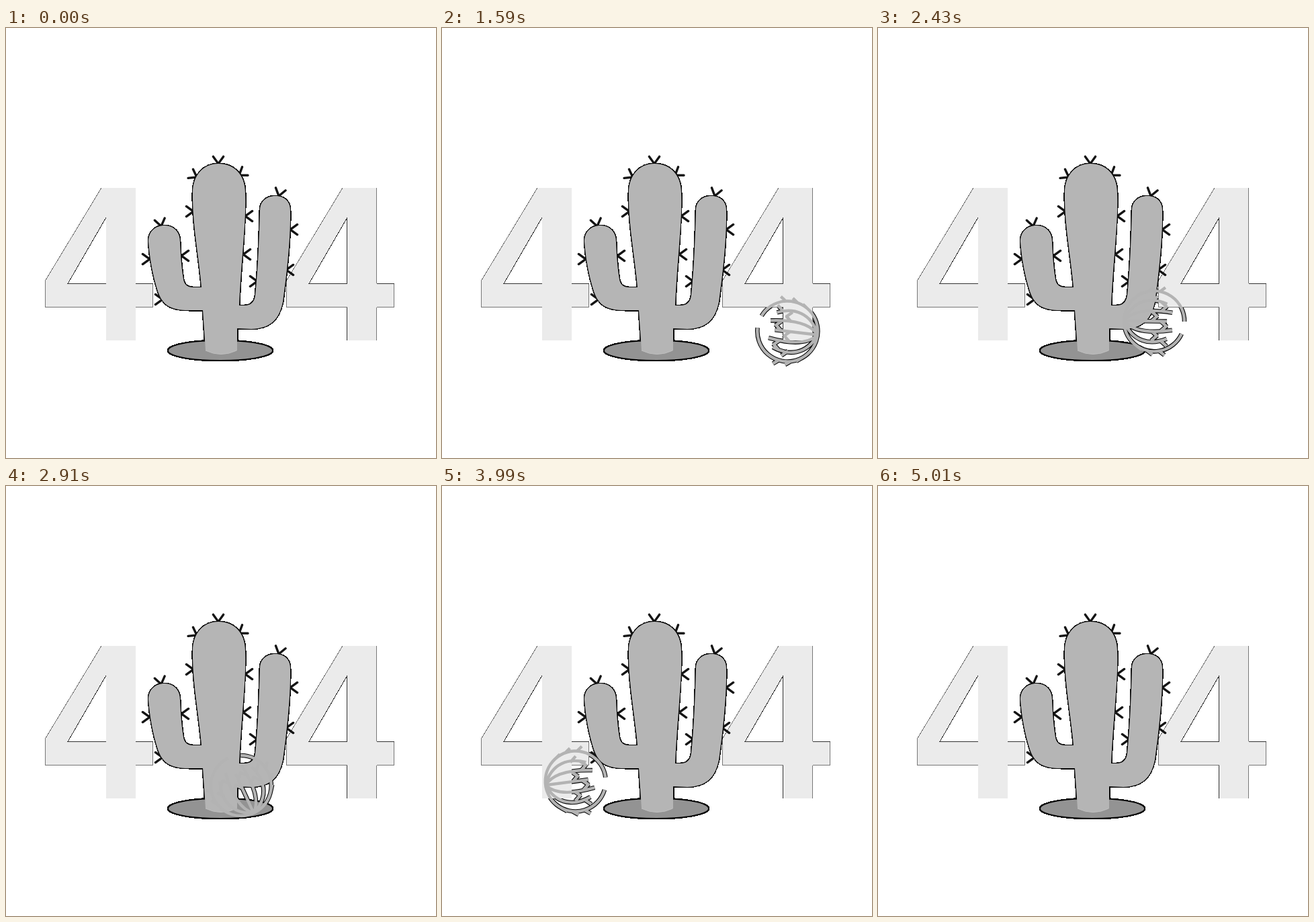
Animation of 640 by 640 pixels, one loop 5.43 s. Source, as an HTML page:

```html
<!DOCTYPE html>
<html lang="en">
<head>
<meta charset="utf-8">
<title>404</title>
<style>
  html, body { margin: 0; width: 100%; height: 100%; overflow: hidden; background: #fff; }
  svg { display: block; width: 100vw; height: 100vh; }
  .edge { fill: none; stroke: #777; shape-rendering: crispEdges; }
  .dark { stroke: #333; }
  .outline { stroke: #080808; stroke-width: 3; shape-rendering: crispEdges; }
  .weed { fill: none; stroke-linejoin: round; }
  #shade { stroke: #050505; stroke-width: 6.6; }
  #weed { stroke: #b3b3b3; stroke-width: 4.4; }
</style>
</head>
<body>
<svg viewBox="0 0 640 640" role="img" aria-label="404">
  <defs>
    <g id="four">
      <path fill="#ebebeb" fill-rule="evenodd"
        d="M142 238H193V380H219V415H193V465H149V415H58V376ZM149 282L92 380H149Z"/>
      <path class="edge" d="M142 238L58.5 376V415.5H149M193 415.5H218.5V380"/>
      <path class="edge dark" d="M149 282L92 380.5H149M193 380.5H219"/>
    </g>
    <path id="body" d="M278 245C278 219 294 202 316 202C340 202 356 219 356 245
      C358 285 350 345 347 413H355Q369 413 371 398C375 360 377 310 378 271
      C378 258 388 250 401 250C414 250 423 258 423 271C424 310 418 365 412 408
      C406 436 392 447 365 448L344 447V480Q320 491 297 480L293 420H272
      C244 420 233 412 226 392C219 370 214 345 212 318C212 303 222 294 236 294
      C250 294 259 304 259 318C260 340 261 355 264 374Q266 386 278 386H291
      C287 340 277 290 278 245Z"/>
    <path id="weedShape"/>
  </defs>

  <use id="shade" class="weed" href="#weedShape"/>

  <use href="#four"/>
  <g transform="translate(359)">
    <use href="#four"/>
    <path class="edge dark" d="M148.5 282V380M148.5 416V465"/>
    <path class="edge" d="M192.5 238V380M192.5 416V465"/>
  </g>

  <path id="spines" fill="none" stroke="#141414" stroke-width="3.4" stroke-linecap="round"/>
  <use href="#body" class="outline"/>
  <ellipse class="outline" cx="319" cy="480" rx="78" ry="15"/>
  <ellipse cx="319" cy="480" rx="77" ry="14" fill="#939393"/>
  <use href="#body" fill="#b5b5b5"/>
  <path d="M297 480Q320 491 343 480" fill="none" stroke="#bebebe"/>

  <use id="weed" class="weed" href="#weedShape"/>
</svg>
<script>
const LOOP = 5430, STEP = 30, START = 870, END = 5010, TAU = Math.PI * 2;
const $ = id => document.getElementById(id);
const lerp = (a, b, u) => a + (b - a) * u;
const polar = (x, y, angle, r) => `${x + r * Math.cos(angle)} ${y + r * Math.sin(angle)}`;

// Spines grow in pairs, pointing away from the axis of their limb
const limbs = [
  { x: 236, top: 318, roots: [[231, 295], [214, 344], [261, 339], [233, 404]] },
  { x: 316, top: 240, roots: [[316, 202], [284, 222], [347, 219], [279, 273], [356, 280], [353, 337]] },
  { x: 400, top: 272, roots: [[406, 250], [423, 300], [417, 360], [374, 377]] }
];
function spinePath() {
  let d = "";
  for (const { x: axis, top, roots } of limbs)
    for (const [x, y] of roots) {
      const out = Math.atan2(y - Math.max(y, top), x - axis);
      for (const turn of [-0.62, 0.62])
        d += `M${polar(x, y, out + turn, 2)}L${polar(x, y, out + turn, 13)}`;
    }
  return d;
}

// An open ring with five branching stems fanning up from its foot
function weedPath() {
  let d = "M18.3 -41.1A45 45 0 1 1 0 -45";
  for (let k = -2; k <= 2; k++) {
    const tip = k % 2 ? -27 : -19;
    d += `M0 45C${16 * k} 32 ${18 * k} 5 ${13 * k} ${tip}`;
    for (const side of [-1, 1]) {
      const y = side * (k % 2 ? 7 : -7) - 3;
      const x = k * 14.5;
      d += `M${x} ${y}l${side * 8} -9`;
    }
  }
  for (const side of [-1, 1])
    for (const y of [-8, 10, 26]) {
      const x = side * Math.sqrt(45 * 45 - y * y);
      d += `M${x} ${y}l${side * 6} -8`;
    }
  return d;
}

// One [x, y] per bounce, evenly spaced in time
const bounces = [[584, 417], [518, 453], [434, 430], [346, 446], [253, 419], [149, 447], [72, 438]];

function pose(t) {
  const u = (t - START) / (END - START);
  const at = u * (bounces.length - 1), i = Math.floor(at), f = at - i;
  const [a, b] = [bounces[i], bounces[i + 1]];
  const x = lerp(a[0], b[0], f);
  const y = lerp(a[1], b[1], Math.sin(f * TAU / 4));
  const spin = 58 - 900 * (u - 0.12 * Math.sin(TAU * u) / TAU);
  return `translate(${x} ${y}) rotate(${spin})`;
}

function draw() {
  const t = Math.floor(performance.now() % LOOP / STEP) * STEP;
  const shown = t >= START && t < END;
  for (const part of [$("shade"), $("weed")]) {
    part.style.display = shown ? "" : "none";
    if (shown) part.setAttribute("transform", pose(t));
  }
  $("weed").style.opacity = Math.max(0, Math.min(1, (t - 840) / 600, (END - t) / 870));
  requestAnimationFrame(draw);
}

$("spines").setAttribute("d", spinePath());
$("weedShape").setAttribute("d", weedPath());
draw();
</script>
</body>
</html>
```
